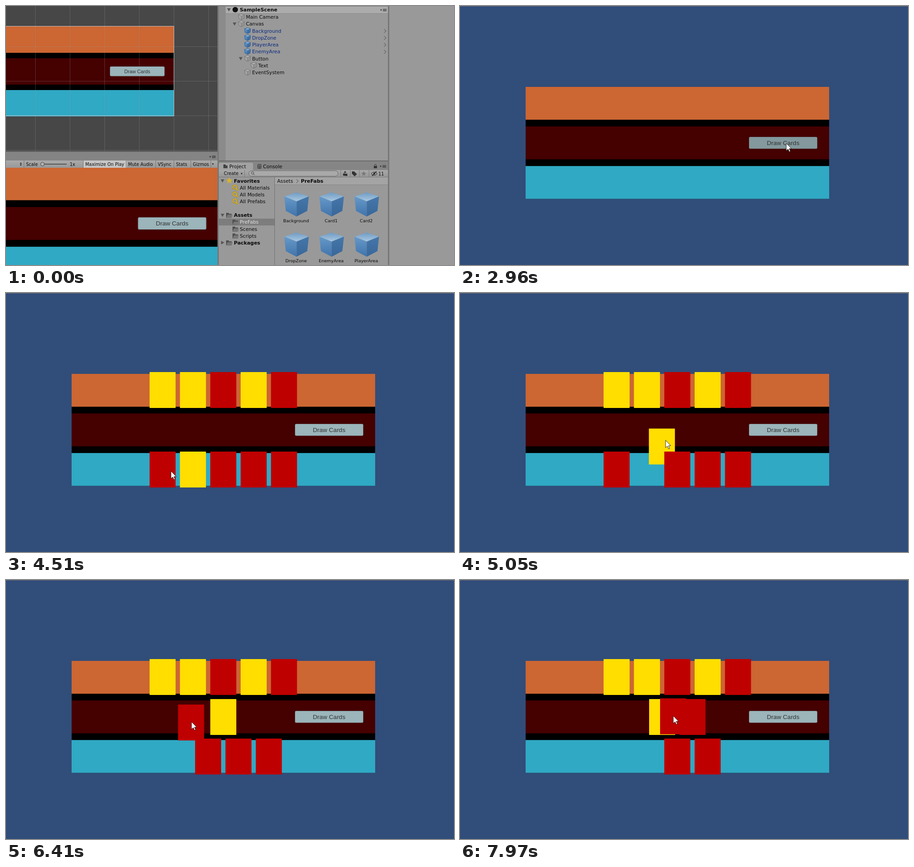
Write an HTML page with a canvas that moves like this. It is 983 by 570 pixels and loops after 8 s.

```html
<!DOCTYPE html>
<html lang="en">
<head>
<meta charset="utf-8">
<title>Card table</title>
<style>
html, body { margin: 0; width: 983px; height: 570px; overflow: hidden; background: #314d79; }
canvas { display: block; }
</style>
</head>
<body>
<canvas id="stage" width="983" height="570"></canvas>
<script>
const ctx = document.getElementById('stage').getContext('2d');
const LOOP = 8000, PLAY = 1480, HOVER = 2710, PRESS = 2960, DEAL = 3110;
const GRAB_1 = 5050, DROP_1 = 5470, GRAB_2 = 6260, DROP_2 = 6800, GRAB_3 = 7490;
const TICK = 130, LAG = 40;
const ORANGE = '#cc6633', MAROON = '#450000', TEAL = '#30a9c4';
const RED = '#bf0000', YELLOW = '#ffde00', INK = '#0a0a0a';
const UI = '"DejaVu Sans", sans-serif', LABEL = '"Liberation Sans", Arial, sans-serif';

function rect(x, y, w, h, fill) {
  ctx.fillStyle = fill;
  ctx.fillRect(x, y, w, h);
}

function poly(fill, ...points) {
  ctx.beginPath();
  points.forEach(([x, y]) => ctx.lineTo(x, y));
  ctx.closePath();
  ctx.fillStyle = fill;
  ctx.fill();
}

function outline(color, width = 1) {
  ctx.strokeStyle = color;
  ctx.lineWidth = width;
  ctx.stroke();
}

function line(x1, y1, x2, y2, color, width) {
  ctx.beginPath();
  ctx.moveTo(x1, y1);
  ctx.lineTo(x2, y2);
  outline(color, width);
}

function box(x, y, w, h, r, fill, stroke) {
  ctx.beginPath();
  ctx.roundRect(x, y, w, h, r);
  if (fill) { ctx.fillStyle = fill; ctx.fill(); }
  if (stroke) outline(stroke);
}

function ring(x, y, r, fill, stroke, width) {
  ctx.beginPath();
  ctx.arc(x, y, r, 0, Math.PI * 2);
  if (fill) { ctx.fillStyle = fill; ctx.fill(); }
  if (stroke) outline(stroke, width);
}

function text(str, x, y, size, { color = INK, bold = false, align = 'left', font = UI } = {}) {
  ctx.font = `${bold ? 'bold ' : ''}${size}px ${font}`;
  ctx.textAlign = align;
  ctx.fillStyle = color;
  ctx.fillText(str, x, y);
}

function shade(y1, y2, from, to) {
  const gradient = ctx.createLinearGradient(0, y1, 0, y2);
  gradient.addColorStop(0, from);
  gradient.addColorStop(1, to);
  return gradient;
}

// Three wide zones separated by two black gaps.
function bands(x, y, w, zone, gap) {
  rect(x, y, w, zone * 3 + gap * 2, '#000');
  [ORANGE, MAROON, TEAL].forEach((color, i) => rect(x, y + i * (zone + gap), w, zone, color));
}

function button(x, y, w, h, size, tint = 1) {
  const fill = `rgb(${[155, 181, 186].map(c => Math.round(c * tint))})`;
  box(x, y, w, h, 3, fill);
  box(x + .5, y + .5, w - 1, h - 1, 3, null, 'rgba(50,65,68,.25)');
  text('Draw Cards', x + w / 2, y + h / 2 + size * .36, size,
    { color: '#323232', align: 'center', font: LABEL });
}

// ---- Editor ----

function triangle(x, y, right = false, s = 4, color = '#555') {
  if (right) poly(color, [x - 3, y - s], [x + 4, y], [x - 3, y + s]);
  else poly(color, [x - s, y - s * .75], [x + s, y - s * .75], [x, y + s]);
}

function chevron(x, y) {
  line(x, y - 4, x + 4.5, y, '#444');
  line(x + 4.5, y, x, y + 4, '#444');
}

function menuIcon(x, y) {
  triangle(x, y, false, 2, '#333');
  for (let i = -1; i < 2; i++) rect(x + 4, y + i * 2 - .5, 8, 1, '#333');
}

function cube(x, y, r, [topA, topB, leftA, leftB, rightA, rightB], edge) {
  const back = [x, y - r], front = [x, y - r * .26], foot = [x, y + r * .97];
  const left = [x - r, y - r * .67], right = [x + r, y - r * .67];
  const leftFoot = [x - r * .87, y + r * .52], rightFoot = [x + r * .87, y + r * .52];
  poly(shade(y - r, y - r * .26, topA, topB), back, right, front, left);
  poly(shade(y - r * .67, y + r, leftA, leftB), left, front, foot, leftFoot);
  poly(shade(y - r * .67, y + r, rightA, rightB), right, front, foot, rightFoot);
  if (!edge) return;
  ctx.beginPath();
  [back, right, rightFoot, foot, leftFoot, left].forEach(p => ctx.lineTo(...p));
  ctx.closePath();
  outline(edge);
  [left, right, foot].forEach(p => line(...front, ...p, edge));
}

const BLUE = ['#6f9bc4', '#a9c8e0', '#6799c8', '#3f73ab', '#4677aa', '#386699'];
const GRAY = ['#b0b0b0', '#b4b4b4', '#a4a4a4', '#a0a0a0', '#969696', '#929292'];

function star(x, y, r, fill) {
  poly(fill, ...Array.from({ length: 10 }, (_, i) => {
    const angle = i * Math.PI / 5 - Math.PI / 2, d = i % 2 ? r * .46 : r;
    return [x + Math.cos(angle) * d, y + Math.sin(angle) * d];
  }));
}

function folder(x, y) {
  rect(x, y - 5, 6, 3, '#4d4d4d');
  rect(x, y - 3, 12, 9, '#4d4d4d');
  poly('#777', [x + 3, y - 1], [x + 14, y - 1], [x + 12, y + 6], [x, y + 6]);
}

function magnifier(x, y, color, r, width) {
  line(x + r * .6, y + r * .6, x + r * 1.8, y + r * 1.8, color, width);
  ring(x, y, r, null, color, width);
}

function sceneView() {
  rect(0, 0, 464, 319, '#474747');
  bands(0, 45, 368, 58, 12);
  button(228, 133, 120, 21.5, 10.8);
  const grid = 'rgba(150,150,150,.32)';
  for (let x = 64.5; x < 464; x += 76) line(x, 0, x, 319, grid);
  for (let y = 89.5; y < 319; y += 76) line(0, y, 464, y, grid);
  ctx.strokeStyle = '#c4c4c4';
  ctx.strokeRect(-2, 44.5, 370.5, 197);
}

function gameView() {
  rect(0, 319, 464, 21, '#848484');
  rect(0, 319, 464, 2, '#606060');
  menuIcon(448, 332);
  bands(0, 355, 464, 72.4, 15);
  rect(0, 340, 464, 16, shade(340, 356, '#aaa', '#989898'));
  rect(170, 340, 95, 16, '#c6c6c6');
  const labels = { 'Scale': 44, '1x': 140, 'Maximize On Play': 174, 'Mute Audio': 268, 'VSync': 333, 'Stats': 373, 'Gizmos': 410 };
  for (const [label, x] of Object.entries(labels)) {
    text(label, x, 351.5, 9.6);
    if (label !== '1x') rect(x - 5, 340, 1, 16, '#777');
  }
  rect(449, 340, 1, 16, '#777');
  poly('#222', [30, 347], [32.5, 344.5], [35, 347]);
  triangle(32.5, 350, false, 2, '#222');
  line(80, 348, 133, 348, '#555', 2);
  ring(80, 348, 4, '#b4b4b4', '#444');
  triangle(454, 348, false, 2, '#222');
  button(289.5, 465, 150, 27, 13.5);
}

function hierarchy() {
  rect(464, 0, 3, 570, '#777');
  rect(467, 0, 371, 341, '#999');
  rect(467, 0, 371, 16, '#acacac');
  rect(467, 0, 15, 341, '#8b8b8b');
  rect(467, 0, 371, 1, '#777');
  rect(467, 16, 371, 1, '#8a8a8a');
  triangle(489, 8);
  ring(503, 8, 6, '#111');
  text('SampleScene', 513, 12, 10.9, { bold: true });
  menuIcon(823, 9);
  const rows = ['Main Camera', 'Canvas', 'Background', 'DropZone', 'PlayerArea', 'EnemyArea', 'Button', 'Text', 'EventSystem'];
  rows.forEach((name, i) => {
    const depth = i < 2 ? 0 : name === 'Text' ? 2 : 1, prefab = i > 1 && i < 6;
    const x = 516.5 + depth * 13.5, y = 24 + i * 15.25;
    if (name === 'Canvas' || name === 'Button') triangle(x - 15, y);
    cube(x, y, 6.7, prefab ? BLUE : GRAY, prefab ? '#3a6699' : '#777');
    text(name, x + 10, y + 4, 10.75, { color: prefab ? '#0b2a80' : INK });
    if (prefab) chevron(829.5, y + .5);
  });
}

function projectTabs() {
  rect(467, 341, 371, 20, '#858585');
  rect(467, 340, 371, 2, '#6a6a6a');
  box(467, 345, 75, 17, [3, 3, 0, 0], '#a2a2a2');
  rect(477, 349, 5, 3, '#333');
  rect(477, 351, 9, 6, '#444');
  text('Project', 490, 357, 10.7);
  box(552.5, 348.5, 7, 9, 1, null, '#222');
  for (let y = 351; y < 357; y += 2) rect(554, y, 4, 1, '#222');
  text('Console', 564, 357, 10.7);
  rect(807, 352, 7, 5, '#333');
  box(808.5, 348.5, 4, 5, 2, null, '#333');
  menuIcon(822, 353);
}

function projectToolbar() {
  rect(467, 361, 371, 15, shade(361, 376, '#a8a8a8', '#979797'));
  rect(467, 376, 371, 1, '#777');
  text('Create', 478, 372, 9.7);
  triangle(517, 369, false, 2, '#222');
  rect(523, 361, 1, 15, '#7b7b7b');
  for (let x = 734; x < 800; x += 20.7) rect(Math.round(x), 361, 1, 15, '#7b7b7b');
  box(532.5, 362.5, 196, 12, 6, '#a9a9a9', '#666');
  magnifier(541, 367.5, '#444', 2.7, 1);
  ring(742, 371, 2.7, '#333');
  poly('#333', [741, 367], [744, 363], [747, 367]);
  rect(744, 369, 5, 5, '#333');
  poly('#333', [759, 364], [764, 364], [770, 370], [765, 375], [759, 369]);
  star(785, 369, 5.5, '#777');
  ctx.beginPath();
  ctx.ellipse(808, 369, 6, 3.5, 0, 0, Math.PI * 2);
  outline('#222');
  ring(808, 369, 2, '#222');
  line(803, 374, 813, 364, '#222', 1.5);
  text('11', 817, 372.5, 9.7);
}

function project() {
  projectTabs();
  projectToolbar();
  rect(467, 377, 371, 193, '#999');
  rect(467, 468, 122, 15, '#7d7d7d');
  rect(589, 377, 1, 193, '#707070');
  rect(590, 377, 248, 16, '#a4a4a4');
  rect(590, 393, 248, 1, '#858585');
  text('Assets', 595, 389, 10.7);
  chevron(637, 385.5);
  text('PreFabs', 647, 389, 10.9, { bold: true });

  const tree = ['Favorites', 'All Materials', 'All Models', 'All Prefabs', '', 'Assets', 'PreFabs', 'Scenes', 'Scripts', 'Packages'];
  tree.forEach((name, i) => {
    const y = 384.5 + i * 15.15;
    if (['Favorites', 'Assets', 'Packages'].includes(name)) {
      triangle(475, y, name === 'Packages');
      if (i) folder(483, y);
      else star(490, y, 7.5, '#d5b32a');
      text(name, 500, y + 4, 10.9, { bold: true });
    } else if (name) {
      if (i > 5) folder(497, y);
      else {
        magnifier(502, y - 1, '#9f7d00', 4.2, 3);
        magnifier(502, y - 1, '#e4c345', 4.2, 1.4);
      }
      text(name, 513, y + 4, 10.7, { color: name === 'PreFabs' ? '#e2e2e2' : INK });
    }
  });
  ['Background', 'Card1', 'Card2', 'DropZone', 'EnemyArea', 'PlayerArea'].forEach((name, i) => {
    const x = 637.5 + i % 3 * 77, y = 437 + Math.floor(i / 3) * 88.5;
    cube(x, y, 27, BLUE);
    text(name, x - 1, y + 38.5, 9.5, { align: 'center' });
  });
}

function editor() {
  rect(0, 0, 983, 570, '#999');
  sceneView();
  gameView();
  hierarchy();
  project();
  rect(838, 0, 3, 570, '#777');
}

// ---- Game ----

// Turning points of the pointer: time, x, y.
const route = [
  [2290, 621, 165], [HOVER, 716, 302], [3790, 714, 302], [4390, 357, 388], [4510, 362, 392],
  [4900, 421, 376], [GRAB_1, 451, 324], [5320, 465, 299], [5710, 382, 359], [5980, 369, 378],
  [6410, 407, 312], [6680, 431, 288], [6920, 419, 315], [7340, 433, 388], [7970, 468, 299]
];

function segment(t) {
  const i = Math.max(0, route.findLastIndex(key => key[0] <= t));
  const from = route[i], to = route[i + 1] || from;
  const span = to[0] - from[0];
  return { from, to, span, count: Math.round(span / TICK) };
}

// The picture refreshes in even ticks within each stretch of the route.
function lastTick(t) {
  const { from, span, count } = segment(t);
  return count ? from[0] + Math.floor((t - from[0]) / span * count) * span / count : from[0];
}

// Long moves ease in and out; short ones are straight.
function pointerAt(t) {
  const { from, to, span, count } = segment(t);
  const p = span ? (t - from[0]) / span : 0;
  const e = count > 2 ? p * p * (3 - 2 * p) : p;
  return [1, 2].map(axis => from[axis] + (to[axis] - from[axis]) * e);
}

function cardRow(cards, top, held = -1, [cx, cy] = []) {
  cards.forEach((color, i) => {
    const left = 476.8 + (i - (cards.length - 1) / 2) * 66.6 - 28.55;
    if (i === held) rect(cx - 28.55, cy - 39.5, 57.1, 79, color);
    else rect(left, top, 57.1, 79, color);
  });
}

function pointer(x, y) {
  ctx.beginPath();
  [[0, 0], [0, 16.5], [4, 13], [6.5, 19], [9, 18], [6.5, 12], [11.5, 12]]
    .forEach(([dx, dy]) => ctx.lineTo(x + dx, y + dy));
  ctx.closePath();
  ctx.fillStyle = '#fff';
  ctx.fill();
  outline('#000', .8);
}

function buttonTint(t) {
  if (t >= PRESS && t < DEAL) return .845;
  return t >= HOVER && t < 3910 ? .96 : 1;
}

function cards(t, tick) {
  const dropped = (t >= DROP_1) + (t >= DROP_2);
  const hand = [[RED, YELLOW, RED, RED, RED], [RED, RED, RED, RED], [RED, RED, RED]][dropped];
  const dragging = t >= [GRAB_1, GRAB_2, GRAB_3][dropped];
  const held = dragging ? (dropped ? 0 : 1) : -1;
  cardRow([YELLOW, RED].slice(0, dropped), 262);
  cardRow(hand, 349, held, pointerAt(tick - LAG));
  cardRow([YELLOW, YELLOW, RED, YELLOW, RED], 174);
}

function game(t) {
  const tick = lastTick(t);
  rect(0, 0, 983, 570, '#314d79');
  rect(0, 0, 983, 1, '#6c6c6c');
  bands(144, 178, 666, 72.3, 14.8);
  button(634, 288, 150, 26.3, 13.5, buttonTint(t));
  if (t >= DEAL) cards(t, tick);
  if (t >= route[0][0]) pointer(...pointerAt(tick));
}

const start = performance.now();
function frame() {
  const t = (performance.now() - start) % LOOP;
  if (t < PLAY) editor();
  else game(t);
  requestAnimationFrame(frame);
}
frame();
</script>
</body>
</html>
```
